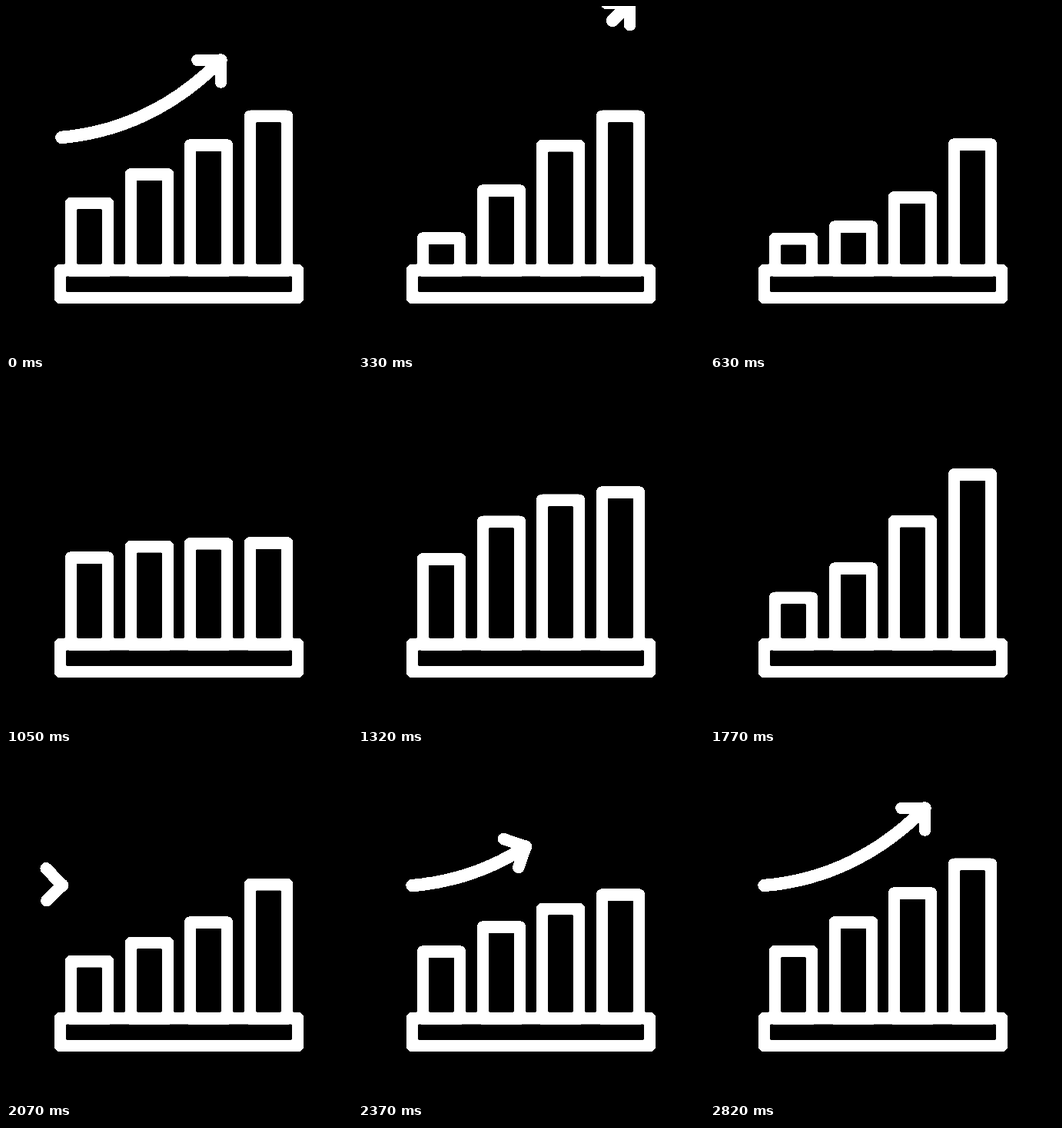
An HTML page with a canvas for the animation above (3600 ms loop, 450 px wide and 450 px high).

```html
<!DOCTYPE html>
<html>
<head>
<meta charset="utf-8">
<style>
  html, body { margin: 0; width: 100%; height: 100%; overflow: hidden; background: #000; }
  canvas { display: block; filter: contrast(20); } /* hard edges */
</style>
</head>
<body>
<canvas id="stage" width="450" height="450"></canvas>
<script>
const ctx = document.getElementById('stage').getContext('2d');
const LOOP = 3600, STEP = 30;
const BASE_Y = 343.7;

function smooth(t, from, to) {
  const u = Math.min(1, Math.max(0, (t - from) / (to - from)));
  return u * u * (3 - 2 * u);
}

// Damped bounce of bar i: each bar follows its left neighbour, with a wider swing
function drop(i, t) {
  const keys = [
    [40 + 135 * i, 0],
    [460 + 135 * i, 59 + 10 * i],
    [1190 + 130 * i, -34.5],
    [1680 + 200 * i, 28 + 5 * i],
    [2430 + 130 * i, 0]
  ];
  let y = 0;
  for (let k = 1; k < keys.length; k++) {
    const [t0, y0] = keys[k - 1], [t1, y1] = keys[k];
    y += (y1 - y0) * smooth(t, t0, t1);
  }
  return y;
}

function drawBar(i, t) {
  const x = 84.5 + Math.round(77.67 * i);
  const top = 256.5 - 37.7 * i + drop(i, t);
  ctx.strokeRect(x, top, 48, BASE_Y - top);
}

// Point on the arrow's curve; past 1 it goes on in a straight line
function track(q) {
  if (q > 1) return [279.5 + 182 * (q - 1), 70.5 - 182 * (q - 1)];
  const a = (1 - q) ** 2, b = 2 * q * (1 - q), c = q * q;
  return [70.5 * a + 189 * b + 279.5 * c, 171 * a + 161 * b + 70.5 * c];
}

function drawArrow(tail, tip) {
  ctx.lineWidth = 16.4;
  ctx.beginPath();
  for (let i = 0; i <= 40; i++) ctx.lineTo(...track(tail + (tip - tail) * i / 40));
  ctx.stroke();

  ctx.save();
  ctx.lineWidth = 15.5;
  ctx.translate(...track(tip));
  ctx.rotate(46 * (1 - Math.min(1, tip) ** 1.4) * Math.PI / 180);
  ctx.beginPath();
  ctx.moveTo(-30.5, 0);
  ctx.lineTo(0, 0);
  ctx.lineTo(0, 28.5);
  ctx.stroke();
  ctx.restore();
}

function draw(t) {
  ctx.fillStyle = '#000';
  ctx.fillRect(0, 0, 450, 450);
  ctx.strokeStyle = '#fff';
  ctx.lineWidth = 15.7;
  ctx.lineCap = ctx.lineJoin = 'round';

  ctx.strokeRect(70.5, BASE_Y, 309, 35.8);
  for (let i = 0; i < 4; i++) drawBar(i, t);

  if (t < 480) drawArrow(1.6 * smooth(t, -20, 470), 1 + 0.6 * smooth(t, 100, 470));
  else if (t >= 2070) drawArrow(0, smooth(t, 2035, 2575));
}

const start = performance.now();
function tick() {
  const t = (performance.now() - start) % LOOP;
  draw(Math.floor(t / STEP) * STEP);
  requestAnimationFrame(tick);
}
tick();
</script>
</body>
</html>
```
